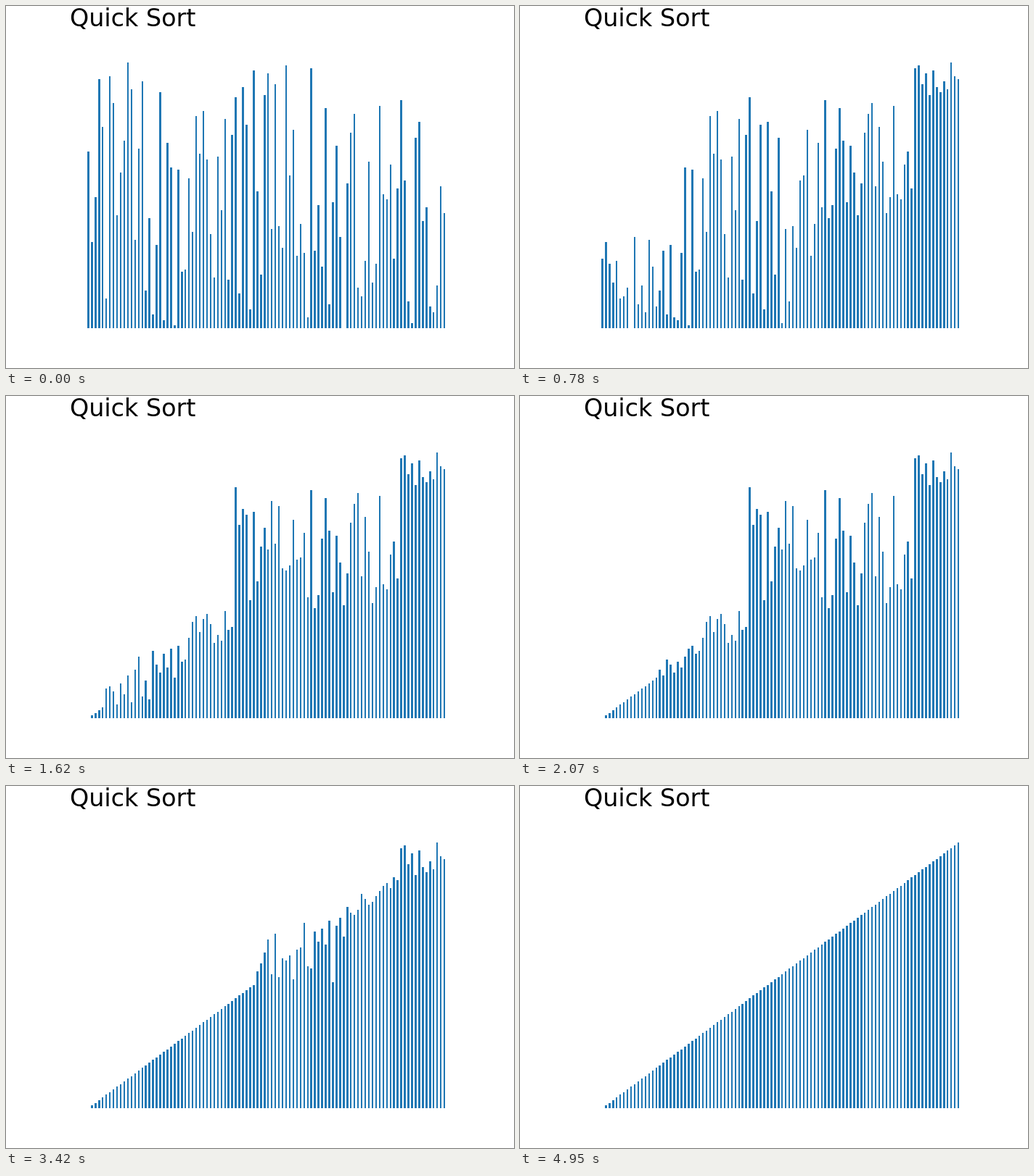
A matplotlib script that plays this animation: 700x500 px, repeating every 4.98 s.

```python
import matplotlib.pyplot as plt
from matplotlib.animation import FuncAnimation

INTERVAL = 30
START = [
    66, 32, 49, 93, 75, 11, 94, 84, 42, 58, 70, 99, 89, 33, 67, 92, 14, 41, 5, 31,
    88, 3, 69, 60, 1, 59, 21, 22, 56, 36, 79, 65, 81, 63, 35, 19, 64, 44, 78, 18,
    72, 86, 13, 90, 76, 7, 96, 51, 20, 87, 95, 37, 91, 38, 30, 98, 57, 74, 27, 39,
    28, 4, 97, 29, 46, 23, 82, 9, 47, 68, 34, 0, 54, 73, 80, 15, 12, 25, 62, 17,
    24, 83, 50, 48, 61, 26, 52, 85, 55, 10, 2, 71, 77, 40, 45, 8, 6, 16, 53, 43,
]


def quick_sort(a, lo, hi):
    """Sort a[lo..hi] in place, yielding a copy after every real swap."""
    if lo >= hi:
        return
    pivot = a[(lo + hi) // 2]
    i, j = lo, hi
    while i <= j:
        while a[i] < pivot:
            i += 1
        while a[j] > pivot:
            j -= 1
        if i <= j:
            if i != j:
                a[i], a[j] = a[j], a[i]
                yield a[:]
            i += 1
            j -= 1
    yield from quick_sort(a, lo, j)
    yield from quick_sort(a, i, hi)


states = [START, *quick_sort(START[:], 0, len(START) - 1)]

plt.rcParams["font.family"] = "DejaVu Sans"
fig, ax = plt.subplots(figsize=(7, 5), dpi=100)
ax.axis("off")
ax.set_title("Quick Sort", fontsize=24, loc="left", pad=23)
bars = ax.bar(range(len(START)), START, width=0.5, color="#1f77b4")


def update(frame):
    for bar, value in zip(bars, states[frame]):
        bar.set_height(value)
    return bars


anim = FuncAnimation(fig, update, frames=len(states), interval=INTERVAL,
                     repeat=True, repeat_delay=0)
plt.show()
```
